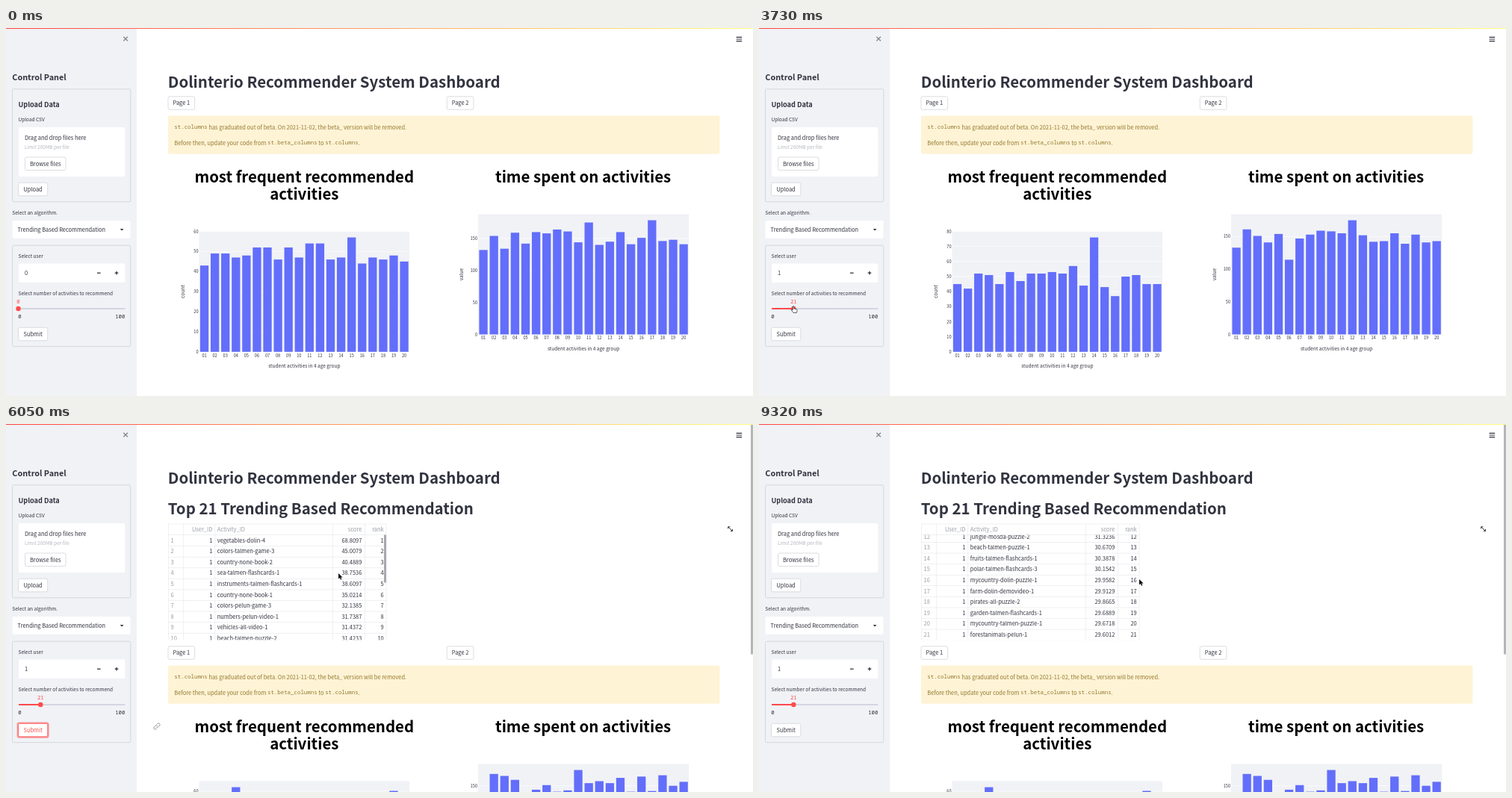
An HTML page with a canvas that plays this animation: 1000 by 493 pixels, repeating every 9690 ms.

```html
<!DOCTYPE html>
<html lang="en">
<head>
<meta charset="utf-8">
<title>Recommender dashboard</title>
<style>
html, body { margin: 0; width: 100%; height: 100%; overflow: hidden; background: #fff; }
canvas { display: block; }
</style>
</head>
<body>
<canvas id="stage" width="1000" height="493"></canvas>
<script>
const ctx = document.getElementById('stage').getContext('2d');
const LOOP = 9690;
const INK = '#31333f', RED = '#ff4b4b', PALE = '#f0f2f6', BLUE = '#636efa', OLIVE = '#93792f';
const BODY = 8.33, SMALL = 7.29, TICK = 6.25;
const SANS = '"Noto Sans CJK JP", "Noto Sans CJK SC", "Noto Sans", sans-serif';
const MONO = '"Noto Sans Mono", "DejaVu Sans Mono", monospace';
const CJK_SCALE = 1.118; // Latin letters in the CJK family are drawn larger

// Twenty seeded values between low and high, with the outliers set by index
function bars(seed, low, high, outliers) {
  const random = () => (seed = seed * 16807 % 2147483647) / 2147483647;
  return Array.from({ length: 20 }, (_, i) =>
    outliers[i] ?? Math.round(low + (high - low) * (random() + random()) / 2));
}

const RUNS = [
  { left: bars(5003, 42, 57, { 14: 57 }), right: bars(7011, 125, 176, { 16: 178.5 }) },
  { left: bars(9029, 36, 60, { 13: 76 }), right: bars(3041, 132, 170, { 5: 114.5, 11: 175 }) },
  { left: bars(6053, 44, 56, { 3: 62, 18: 60 }), right: bars(8069, 130, 172, { 9: 174 }) },
];

const ROWS = `vegetables-dolin-4 68.8097
colors-talmen-game-3 45.0079
country-none-book-2 40.4889
sea-talmen-flashcards-1 38.7536
instruments-talmen-flashcards-1 38.6097
country-none-book-1 35.0214
colors-pelun-game-3 32.1385
numbers-pelun-video-1 31.7387
vehicles-all-video-1 31.4372
beach-talmen-puzzle-2 31.4233
environment-talmen-identification-2 31.3408
jungle-mosda-puzzle-2 31.3236
beach-talmen-puzzle-1 30.6709
fruits-talmen-flashcards-1 30.3878
polar-talmen-flashcards-3 30.1542
mycountry-dolin-puzzle-1 29.9582
farm-dolin-demovideo-1 29.9129
pirates-all-puzzle-2 29.8665
garden-talmen-flashcards-1 29.6889
mycountry-talmen-puzzle-1 29.6718
forestanimals-pelun-1 29.6012`.split('\n').map(row => row.split(' '));

// Cursor moves; it rests between them
const MOVES = [
  { from: 840, to: 1200, x: 157, y: 329 },   // plus button
  { from: 1560, to: 1920, x: 16.5, y: 373 }, // slider thumb
  { from: 2040, to: 2640, x: 58, y: 373 },   // drag
  { from: 2640, to: 3000, x: 46.3, y: 373 },
  { from: 4230, to: 4710, x: 37, y: 407 },   // submit
  { from: 5210, to: 5570, x: 93, y: 386 },
  { from: 5570, to: 5810, x: 330, y: 400 },
  { from: 5810, to: 6050, x: 445, y: 200 },  // table
  { from: 6290, to: 7130, x: 506, y: 187 },  // its scrollbar
  { from: 7380, to: 8340, x: 507, y: 277 },  // drag
  { from: 8960, to: 9320, x: 509, y: 208 },
];

const clamp = (v, low, high) => Math.min(high, Math.max(low, v));
const during = (t, from, to) => t >= from && t < to;

function cursorAt(t) {
  return MOVES.reduce(({ x, y }, move) => {
    const p = clamp((t - move.from) / (move.to - move.from), 0, 1);
    return { x: x + (move.x - x) * p, y: y + (move.y - y) * p };
  }, { x: 135, y: 275 });
}

// Both drags follow the cursor
const sliderAt = t => t < 2040 ? 0 : (cursorAt(Math.min(t, 3000)).x - 16.5) / 1.42;
const scrollAt = t => t < 7380 ? 0 : clamp((cursorAt(Math.min(t, 8340)).y - 187) * 2.19, 0, 165.5);

// y is the middle of the capitals
function text(s, x, y, { size = BODY, color = INK, align = 'left', weight = 400, mono = false } = {}) {
  ctx.font = mono ? `${size}px ${MONO}` : `${weight} ${size / CJK_SCALE}px ${SANS}`;
  ctx.fillStyle = color;
  ctx.textAlign = align;
  ctx.fillText(s, x, y + size * 0.33);
  return ctx.measureText(s).width;
}

function rect(x, y, w, h, color) {
  ctx.fillStyle = color;
  ctx.fillRect(x, y, w, h);
}

function box(x, y, w, h, fill, stroke, width = 0.8) {
  ctx.beginPath();
  ctx.roundRect(x, y, w, h, 2);
  if (fill) { ctx.fillStyle = fill; ctx.fill(); }
  if (stroke) { ctx.strokeStyle = stroke; ctx.lineWidth = width; ctx.stroke(); }
}

function path(d, { stroke, fill, width = 1, x = 0, y = 0 }) {
  const shape = new Path2D(d);
  ctx.save();
  ctx.translate(x, y);
  if (fill) { ctx.fillStyle = fill; ctx.fill(shape); }
  if (stroke) { ctx.strokeStyle = stroke; ctx.lineWidth = width; ctx.stroke(shape); }
  ctx.restore();
}

function dot(x, y, r, color) {
  ctx.beginPath();
  ctx.arc(x, y, r, 0, 7);
  ctx.fillStyle = color;
  ctx.fill();
}

function button(label, x, y, w, focused) {
  if (focused) box(x - 1, y - 1, w + 2, 19.5, null, 'rgba(255,75,75,.55)', 1.8);
  box(x, y, w, 17.5, '#fff', focused ? RED : '#d3d5da');
  text(label, x + w / 2, y + 8.8, { align: 'center', color: focused ? RED : INK });
}

function sidebar(t) {
  const small = { size: SMALL }, selectFocus = during(t, 480, 1440), plusHover = during(t, 1200, 1560);
  const value = sliderAt(t), thumb = 16.5 + value * 1.42;
  rect(0, 0, 175, 493, PALE);
  path('M157.3 11.7l5.6 5.6M162.9 11.7l-5.6 5.6', { stroke: '#85878f', width: 1.3 });
  text('Control Panel', 8.3, 66.5, { size: 12.1, weight: 700 });

  box(8.5, 81.8, 158.3, 151, null, '#cfd1d8');
  text('Upload Data', 16.5, 103, { size: 10.2, weight: 700 });
  text('Upload CSV', 16.5, 123, small);
  box(17, 133, 142.3, 66, '#fff');
  text('Drag and drop files here', 25, 147.2);
  text('Limit 200MB per file', 25, 160, { size: SMALL, color: '#b4b7bf' });
  button('Browse files', 25.5, 173, 54.5);
  button('Upload', 16.5, 207.3, 39.2);

  text('Select an algorithm.', 8.3, 247.5, small);
  box(8.6, 258, 157.8, 24, '#fff', selectFocus ? RED : null, 1);
  const width = text('Trending Based Recommendation', 15.6, 270);
  if (selectFocus) rect(16 + width, 265.5, 0.7, 9, '#222');
  path('M152.8 269h4.6l-2.3 2.6z', { fill: INK });

  box(8.5, 291.2, 158.3, 135.5, null, '#cfd1d8');
  text('Select user', 16.5, 305.5, small);
  box(17, 315.5, 142.3, 25.5, '#fff');
  text(t < 1440 ? '0' : '1', 25, 328);
  if (plusHover) rect(136, 315.5, 23.3, 25.5, RED);
  path('M122 328.2h4.6', { stroke: INK, width: 1.3 });
  path('M145.7 328.2h4.6M148 325.9v4.6', { stroke: plusHover ? '#fff' : INK, width: 1.3 });

  text('Select number of activities to recommend', 16.5, 355.5, small);
  const mono = { size: SMALL, mono: true };
  rect(17, 375, 142.3, 2, '#d3d5e0');
  rect(17, 375, thumb - 17, 2, RED);
  dot(thumb, 376, 3.2, RED);
  text(Math.round(value), thumb, 366.8, { ...mono, color: RED, align: 'center' });
  text('0', 16.3, 387, mono);
  text('100', 159.3, 387, { ...mono, align: 'right' });
  button('Submit', 16.5, 401.3, 39.2, during(t, 4960, 7380));
}

function chart({ x, top, w, h, values, step, label, titleY }) {
  const limit = Math.max(...values) / 0.95, base = top + h, slot = w / 20;
  rect(x, top, w, h, PALE);
  for (let v = 0; v <= limit + 0.01; v += step) {
    const y = base - v / limit * h;
    if (v) rect(x, y - 0.3, w, 0.6, '#fff');
    text(v, x - 1, y, { size: TICK, align: 'right' });
  }
  values.forEach((v, i) => {
    const height = v / limit * h;
    rect(x + slot * (i + 0.1), base - height, slot * 0.8, height, BLUE);
    text(String(i + 1).padStart(2, '0'), x + slot * (i + 0.5), base + 4.8, { size: TICK, align: 'center' });
  });
  text('student activities in 4 age group', x + w / 2, titleY, { size: SMALL, align: 'center' });
  ctx.save();
  ctx.translate(x - 22, top + h / 2);
  ctx.rotate(-Math.PI / 2);
  text(label, 0, 0, { size: SMALL, align: 'center' });
  ctx.restore();
}

function alertBox() {
  box(217, 117.5, 738.5, 51.3, '#fef3d5');
  const line = (y, ...parts) => parts.reduce((x, part) => {
    const mono = part.startsWith('st.');
    return x + text(part, x, y, { color: OLIVE, mono, size: mono ? 7.42 : BODY });
  }, 225.3);
  line(133, 'st.columns', ' has graduated out of beta. On 2021-11-02, the beta_ version will be removed.');
  line(154, 'Before then, update your code from ', 'st.beta_columns', ' to ', 'st.columns', '.');
}

function pageBody(t, shift) {
  const run = RUNS[t < 840 ? 0 : t < 5930 ? 1 : 2];
  ctx.save();
  ctx.translate(0, shift);
  if (!during(t, 5450, 5930)) {
    button('Page 1', 217, 91.8, 35.6);
    button('Page 2', 590.3, 91.8, 35.6);
  }
  if (!during(t, 960, 1680)) alertBox();
  const title = { size: 22.85, color: '#000', weight: 700, align: 'center' };
  text('most frequent recommended', 399.3, 199.2, title);
  text('activities', 399.3, 222, title);
  text('time spent on activities', 772.6, 199.2, title);
  chart({ x: 258.5, top: 272.5, w: 281.6, h: 161.3, values: run.left, step: 10, label: 'count', titleY: 453 });
  chart({ x: 632, top: 249.5, w: 282.2, h: 161, values: run.right, step: 50, label: 'value', titleY: 430 });
  ctx.restore();
}

function table(t) {
  const scroll = scrollAt(t), rowHeight = 14.58, line = '#e4e6ea';
  const gray = { color: '#9a9ca5' }, right = { align: 'right' };
  text('User_ID', 276.3, 141.5, { ...gray, ...right });
  text('Activity_ID', 282.8, 141.5, gray);
  text('score', 476.3, 141.5, { ...gray, ...right });
  text('rank', 505.7, 141.5, { ...gray, ...right });
  ctx.save();
  ctx.beginPath();
  ctx.rect(217, 148.3, 292.5, 141);
  ctx.clip();
  ROWS.forEach(([name, score], i) => {
    const y = 156 + i * rowHeight - scroll;
    rect(217, y + rowHeight / 2, 292, 0.6, line);
    text(i + 1, 220.6, y, gray);
    text('1', 276.3, y, right);
    text(name, 282.8, y);
    text(score, 476.3, y, right);
    text(i + 1, 505.7, y, right);
  });
  ctx.restore();
  for (const x of [217, 237.5, 279.5, 437.3, 480.3, 508.8]) rect(x, 134, 0.6, 155, line);
  for (const y of [133.7, 148]) rect(217, y, 292, 0.6, line);
  if (t < 8710) rect(506, 148.5 + scroll * 0.458, 3, 64, t < 7130 ? '#a8a9ad' : '#8b8c91');
  path('M967 138l5.2 5.2M966.7 140.3v-2.6h2.6M972.5 140.8v2.6h-2.6', { stroke: INK });
}

function status(t) {
  if (t < 3000) {
    dot(886.2, 10.8, 1.2, '#777');
    path('M880.5 12.2l3.5 .3-1.4 3.6h3.6l1.4 4M884 12.5l2 2.2h2M881.8 15a2.7 2.7 0 1 0 3.4 3.6', { stroke: '#777', width: 1.1 });
  } else {
    dot(883.5, 10.4, 1.2, '#777');
    path('M879.2 12.4h8.6v1.2h-2.6v7h-1.1v-3.2h-1.2v3.2h-1.1v-7h-2.6z', { fill: '#777' });
  }
  text('RUNNING...', 894.7, 15.4, { size: 7, color: '#b3b5bc' });
  if (t >= 1200) {
    box(933.5, 6.6, 33.2, 16.4, '#fff', '#d3d5da');
    text('Stop', 950, 14.9, { align: 'center' });
  }
}

function pointer(t) {
  if (t < 360) return;
  const at = cursorAt(t);
  if (during(t, 1080, 5210)) {
    path('M-1 0q1-1 1.6 0v3l3.4 .8q1 .4 .8 1.5l-.8 3.2h-4.2l-2.8-3.6q0-1.2 1-.8l1 .8z',
      { ...at, fill: '#fff', stroke: '#222', width: 0.7 });
  } else {
    const arrow = 'M0 0v7.6l1.8-1.7 1.3 2.8 1.3-.6-1.3-2.7h2.5z';
    path(arrow, { ...at, stroke: '#fff', width: 1.2 });
    path(arrow, { ...at, fill: '#111' });
  }
}

function draw(t) {
  const heading = { size: 22.85, weight: 700 };
  rect(0, 0, 1000, 493, '#fff');
  pageBody(t, t < 5450 ? 0 : t < 5930 ? 15.5 : 206);
  text('Dolinterio Recommender System Dashboard', 216.8, 72, heading);
  if (t >= 5450) text('Top 21 Trending Based Recommendation', 216.8, 113.7, heading);
  if (t >= 5930) {
    table(t);
    rect(997, 0, 3, 308.5, '#b4b5b9');
  }
  if (during(t, 5930, 6290)) {
    path('M201.2 405.8a1.9 1.9 0 0 0 2.7 0l1.6-1.6a1.9 1.9 0 0 0-2.7-2.7l-.9 .9M202.8 404.2a1.9 1.9 0 0 0-2.7 0l-1.6 1.6a1.9 1.9 0 0 0 2.7 2.7l.9-.9', { stroke: '#85878f', width: 0.9 });
  }
  sidebar(t);
  if (during(t, 840, 1680) || during(t, 5210, 5930)) status(t);
  path('M977.6 12.4h7.6M977.6 15h7.6M977.6 17.6h7.6', { stroke: INK, width: 1.2 });
  const rainbow = ctx.createLinearGradient(0, 0, 1000, 0);
  rainbow.addColorStop(0, RED);
  rainbow.addColorStop(1, '#fffd80');
  rect(0, 0, 1000, 1.1, rainbow);
  pointer(t);
}

const start = performance.now();
function frame() {
  draw((performance.now() - start) % LOOP);
  requestAnimationFrame(frame);
}
frame();
</script>
</body>
</html>
```
